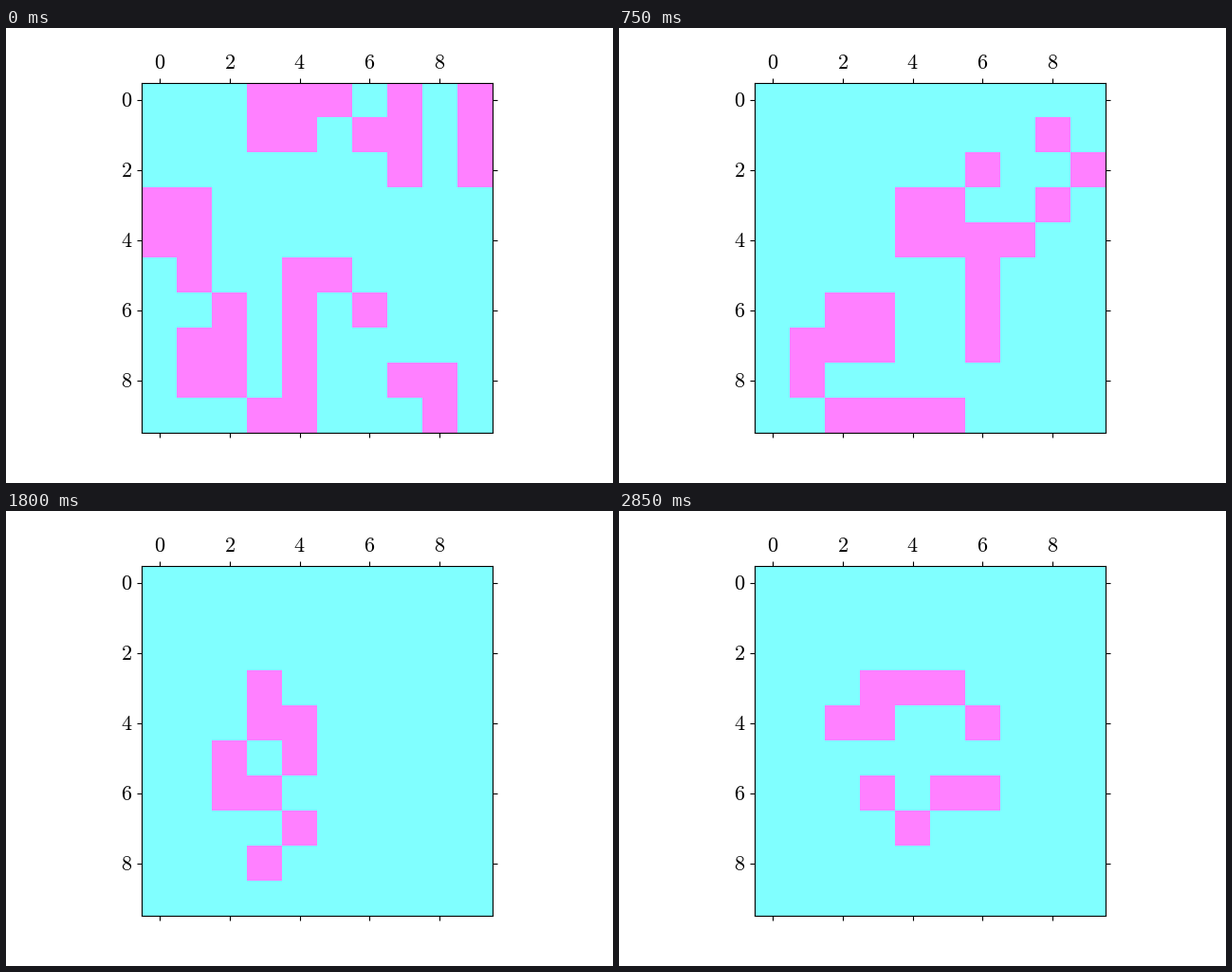
A matplotlib script for the animation above (3000 ms loop, 640x480 px).

```python
import matplotlib.pyplot as plt
import numpy as np
from matplotlib.animation import FuncAnimation
from matplotlib.colors import ListedColormap

FRAMES = 20
INTERVAL = 150

START = """
...###.#.#
...##.##.#
.......#.#
##........
##........
.#..##....
..#.#.#...
.##.#.....
.##.#..##.
...##...#.
"""


def parse(text):
    return np.array([[ch == "#" for ch in row] for row in text.split()], dtype=int)


def step(grid):
    """One Game of Life generation; cells beyond the border count as dead."""
    rows, cols = grid.shape
    padded = np.pad(grid, 1)
    block = sum(padded[i:i + rows, j:j + cols] for i in range(3) for j in range(3))
    return ((block == 3) | ((block == 4) & (grid == 1))).astype(int)


generations = [parse(START)]
while len(generations) < FRAMES:
    generations.append(step(generations[-1]))

plt.rcParams.update({
    "font.family": "Liberation Serif",
    "mathtext.fontset": "cm",
    "font.size": 16,
})

fig, ax = plt.subplots(figsize=(6.4, 4.8), dpi=100)
image = ax.matshow(generations[0], cmap=ListedColormap(["#80ffff", "#ff80ff"]),
                   vmin=0, vmax=1, interpolation="nearest")

ticks = range(0, 10, 2)
labels = [f"${n}$" for n in ticks]
ax.set_xticks(ticks, labels)
ax.set_yticks(ticks, labels)
ax.yaxis.set_ticks_position("both")


def update(i):
    image.set_data(generations[i])
    return [image]


anim = FuncAnimation(fig, update, frames=FRAMES, interval=INTERVAL,
                     repeat=True, repeat_delay=0)
plt.show()
```
